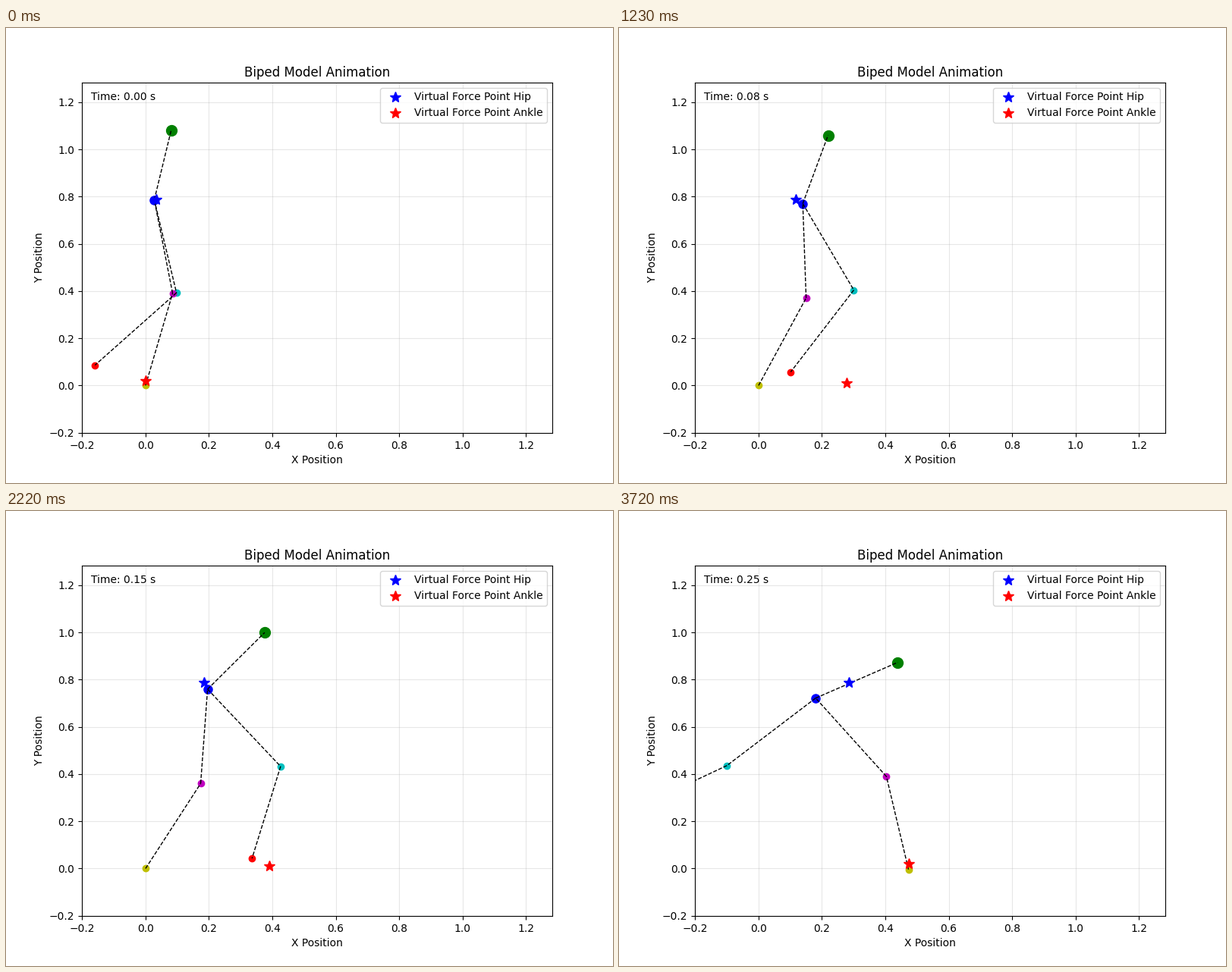
These frames come from a looping animation (800 px wide and 600 px high, 3.75 s). A matplotlib script:

```python
import numpy as np
import matplotlib.pyplot as plt
from matplotlib.animation import FuncAnimation

FRAMES, INTERVAL = 125, 30
DURATION = 0.25
SWITCH = 92          # frame where the swing foot lands and the legs swap
LEG, TORSO = 0.4, 0.3
MARGIN = 0.20086


def sway(u, start, end, *waves):
    """Straight change from start to end plus sine overtones that vanish at both ends."""
    ripple = sum(w * np.sin((k + 1) * np.pi * u) for k, w in enumerate(waves))
    return start + (end - start) * u + ripple


def first_step(u):
    """Angles from the vertical while the rear leg swings forward."""
    return dict(
        shank=sway(u, 0.215, 0.520, 0.018, 0.006, -0.016),
        thigh=sway(u, -0.145, 0.235, -0.085, 0.036, -0.024),
        torso=sway(u, 0.179, 0.880, -0.207, 0, 0.021),
        swing_thigh=sway(u, 0.176, 0.550, 0.109, -0.060, 0.018),
        swing_shank=sway(u, -0.698, -0.070, -0.082, 0.020, 0.033),
    )


def second_step(u):
    """The legs swap roles on landing, then the body falls back."""
    last = first_step(1)
    return dict(
        shank=sway(u, -last["swing_shank"], -0.175, 0.008),
        thigh=sway(u, -last["swing_thigh"], -0.592, 0.062),
        torso=sway(u, last["torso"], 1.042, 0.044),
        swing_thigh=sway(u, -last["thigh"], -0.775),
        swing_shank=sway(u, -last["shank"], -1.008, 0.073),
    )


def polar(angle, length):
    return length * np.array([np.sin(angle), np.cos(angle)])


def build(foot, angles):
    """Chain the links from the stance foot to the swing ankle."""
    knee = foot + polar(angles["shank"], LEG)
    hip = knee + polar(angles["thigh"], LEG)
    swing_knee = hip - polar(-angles["swing_thigh"], LEG)
    return {
        "foot": foot,
        "knee": knee,
        "hip": hip,
        "head": hip + polar(angles["torso"], TORSO),
        "swing_knee": swing_knee,
        "ankle": swing_knee - polar(-angles["swing_shank"], LEG),
    }


ORIGIN = np.zeros(2)
LANDING = build(ORIGIN, first_step(1))["ankle"]


def pose(frame):
    if frame < SWITCH:
        return build(ORIGIN, first_step(frame / SWITCH))
    return build(LANDING, second_step((frame - SWITCH) / (FRAMES - 1 - SWITCH)))


def force_points(joints, time):
    """Targets pulling the hip forward and the swing ankle to its landing."""
    foot_x, hip_x = joints["foot"][0], joints["hip"][0]
    hip_target = (0.0345 + time, 0.787)
    if joints["ankle"][0] < foot_x:
        return hip_target, (foot_x, 0.02)
    return hip_target, (2 * hip_x - foot_x, 0.01)


fig, ax = plt.subplots(figsize=(8, 6), dpi=100)
ax.set_xlim(-MARGIN, 1.484 - MARGIN)
ax.set_ylim(-MARGIN, 1.484 - MARGIN)
ax.set_xlabel("X Position")
ax.set_ylabel("Y Position")
ax.set_title("Biped Model Animation")
ax.grid(True, alpha=0.3)

STYLES = {"head": ("go", 10), "hip": ("bo", 8), "swing_knee": ("co", 6),
          "knee": ("mo", 6), "ankle": ("ro", 6), "foot": ("yo", 6)}
LINKS = [("foot", "knee"), ("knee", "hip"), ("hip", "head"),
         ("hip", "swing_knee"), ("swing_knee", "ankle")]

dots = {name: ax.plot([], [], fmt, markersize=size)[0]
        for name, (fmt, size) in STYLES.items()}
links = [ax.plot([], [], "k--", lw=1)[0] for _ in LINKS]
stars = [ax.plot([], [], fmt, markersize=10, label=label)[0]
         for fmt, label in (("b*", "Virtual Force Point Hip"),
                            ("r*", "Virtual Force Point Ankle"))]
clock = ax.text(0.02, 0.95, "", transform=ax.transAxes)
ax.legend(loc="upper right")


def update(frame):
    time = DURATION * frame / (FRAMES - 1)
    joints = pose(frame)
    for name, dot in dots.items():
        dot.set_data(*joints[name][:, None])
    for link, (a, b) in zip(links, LINKS):
        link.set_data(*np.transpose([joints[a], joints[b]]))
    for star, (x, y) in zip(stars, force_points(joints, time)):
        star.set_data([x], [y])
    clock.set_text(f"Time: {time:.2f} s")
    return [*dots.values(), *links, *stars, clock]


anim = FuncAnimation(fig, update, frames=FRAMES, interval=INTERVAL,
                     repeat=True, repeat_delay=0, blit=False)
plt.show()
```
